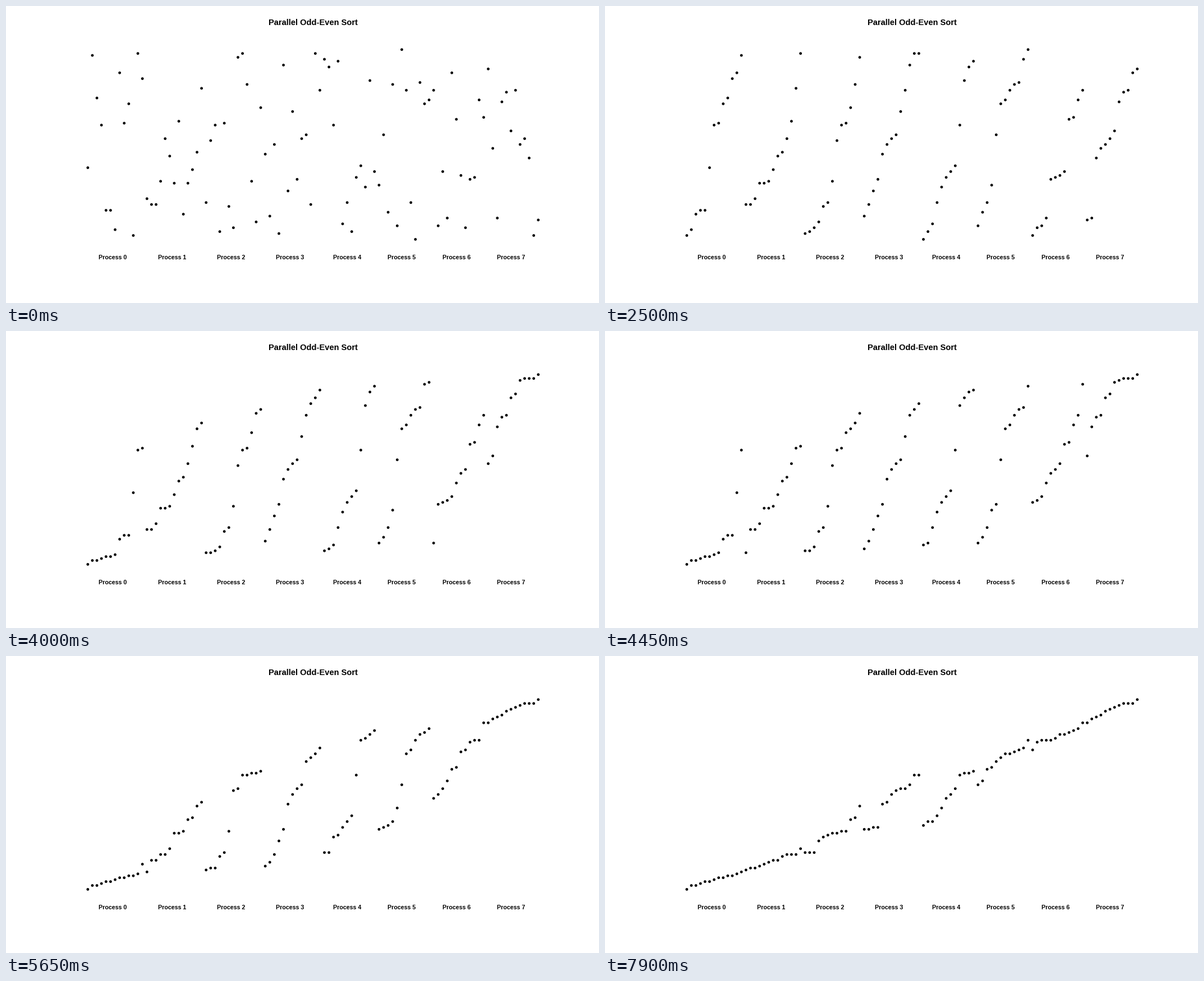
Animation of 1057 by 530 pixels, one loop 8000 ms. Source, as a matplotlib script:

```python
import matplotlib.pyplot as plt
from matplotlib.animation import FuncAnimation
from matplotlib.patches import Circle

W, H, DPI = 1057, 530, 64
LOOP_MS, INTERVAL = 8000, 50
SORT_MS, EXCHANGE_MS, STEP_MS = 500, 2500, 150
DOT_RADIUS = 2.4

# One row of unsorted values per process
START = [
    [38, 96, 74, 60, 16, 16, 6, 87, 61, 71, 3, 97, 84],
    [22, 19, 19, 31, 53, 44, 30, 62, 14, 30, 37, 46, 79],
    [20, 52, 60, 5, 61, 18, 7, 95, 97, 81, 31, 10, 69],
    [45, 13, 50, 4, 91, 26, 67, 32, 53, 55, 19, 97, 78],
    [94, 90, 60, 93, 9, 20, 5, 33, 39, 28, 83, 36],
    [29, 55, 15, 81, 8, 99, 78, 20, 1, 82, 71, 73],
    [78, 8, 36, 12, 87, 63, 34, 7, 32, 33, 73, 64],
    [89, 48, 12, 72, 77, 57, 78, 50, 53, 43, 3, 11],
]


def px_x(column):
    return W * (0.13 + 0.775 * column / 101)


def px_y(value):
    return H * (0.89 - 0.815 * (value + 15) / 125)


def exchange(blocks, parity):
    """Neighbouring processes trade the left maximum for the right minimum."""
    blocks = [list(block) for block in blocks]
    for i in range(parity, len(blocks) - 1, 2):
        left, right = blocks[i], blocks[i + 1]
        if left[-1] > right[0]:
            left[-1], right[0] = right[0], left[-1]
            left.sort()
            right.sort()
    return blocks


def build_states():
    states = [START, [sorted(block) for block in START]]
    for step in range((LOOP_MS - EXCHANGE_MS) // STEP_MS + 1):
        states.append(exchange(states[-1], step % 2))
    return [sum(blocks, []) for blocks in states]


def state_index(ms):
    if ms < EXCHANGE_MS:
        return int(ms >= SORT_MS)
    return 2 + (ms - EXCHANGE_MS) // STEP_MS


fig = plt.figure(figsize=(W / DPI, H / DPI), dpi=DPI, facecolor="white")
ax = fig.add_axes([0, 0, 1, 1])
ax.set_xlim(0, W)
ax.set_ylim(H, 0)
ax.axis("off")


def label(x, baseline, text, size_px):
    ax.text(x, baseline, text, fontsize=size_px * 72 / DPI, color="black",
            family="Liberation Sans", weight="bold", ha="center", va="baseline")


label(547.3, 34, "Parallel Odd-Even Sort", 14.67)
first = 1
for number, block in enumerate(START):
    middle = first + (len(block) - 1) / 2
    label(px_x(middle) - 3.9, 451.5, f"Process {number}", 10.67)
    first += len(block)

STATES = build_states()
dots = [Circle((px_x(i + 1) + 0.3, px_y(v)), DOT_RADIUS, color="black", linewidth=0)
        for i, v in enumerate(STATES[0])]
for dot in dots:
    ax.add_patch(dot)


def update(frame):
    for dot, value in zip(dots, STATES[state_index(frame * INTERVAL)]):
        dot.center = (dot.center[0], px_y(value))
    return dots


anim = FuncAnimation(fig, update, frames=LOOP_MS // INTERVAL, interval=INTERVAL,
                     repeat=True, repeat_delay=0, blit=False)
plt.show()
```
